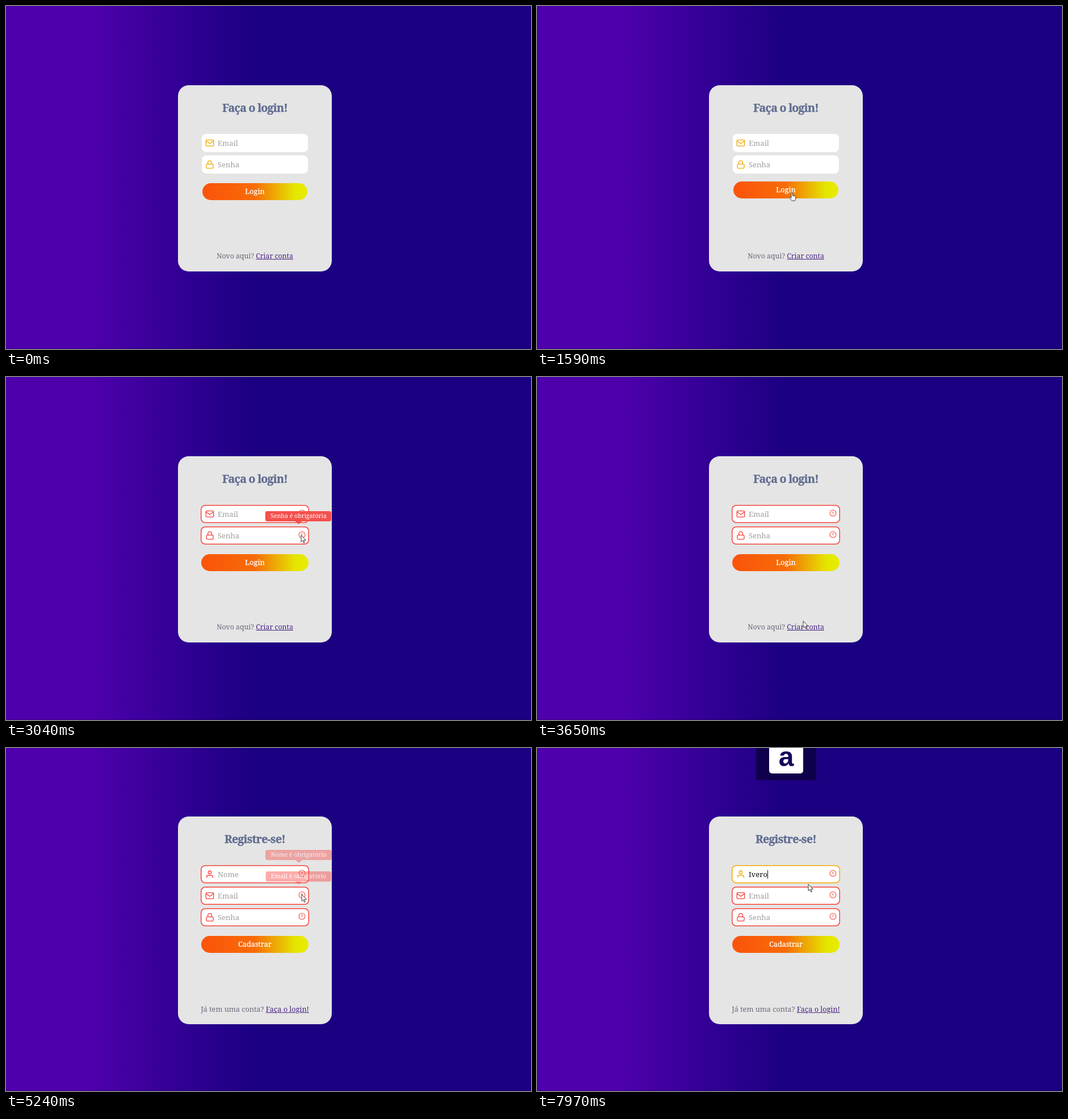
Recreate the animation shown at these times as an HTML page. Size 925 px wide and 606 px high, loop 8 s.

```html
<!DOCTYPE html>
<html lang="pt-BR">
<head>
<meta charset="utf-8">
<title>Login</title>
<style>
  html, body { margin: 0; width: 100%; height: 100%; overflow: hidden; }
  body {
    position: relative;
    background: linear-gradient(90deg, #4f00ad 140px, #1c0082 432px);
    font: 13px "Roboto Slab", "Noto Serif", serif;
    --loop: 8s linear infinite;
    --jump: 8s step-end infinite;
  }
  body::after {
    content: ""; position: absolute; left: 0; right: 0; bottom: 0;
    height: 1px; background: rgba(0, 0, 0, .25);
  }
  svg { position: absolute; overflow: visible; fill: none; stroke: currentColor;
    stroke-width: 2; stroke-linecap: round; stroke-linejoin: round; }

  /* Cards */
  .card { position: absolute; left: 302.7px; width: 271.6px; border-radius: 19px;
    background: #e5e5e5; white-space: nowrap; }
  #login { --late: 0s; top: 140px; height: 329px; animation: leave var(--jump); }
  #register { --late: 2.76s; top: 121px; height: 367px; animation: enter var(--jump); }
  @keyframes leave { 0% { visibility: visible } 48.125%, 100% { visibility: hidden } }
  @keyframes enter { 0% { visibility: hidden } 48.125%, 100% { visibility: visible } }

  h1 { position: absolute; top: 20px; width: 100%; margin: 0; text-align: center;
    font-size: 19.5px; line-height: 40px; letter-spacing: -.7px; color: #5f6c90;
    -webkit-text-stroke: .3px; }
  p { position: absolute; bottom: 16.8px; width: 100%; margin: 0; text-align: center;
    font-size: 12.3px; line-height: 20px; color: #6c667a; }
  #register p { font-size: 12.7px; }
  u { color: #4a2382; }

  /* Fields: the error state starts at 1820 ms plus the card's delay */
  .row { position: absolute; top: var(--y); width: 100%; height: 32px; line-height: 32px;
    color: #f2a900; animation: tint var(--loop) var(--late); }
  .box { position: absolute; left: 0; right: 0; margin: auto; width: 187.5px; height: 32px;
    border-radius: 8px; background: #fff; animation: outline var(--loop) var(--late); }
  .icon { left: 48.3px; top: 8px; width: 16px; height: 16px; }
  .hint { position: absolute; left: 70.3px; color: #a09d9b; }
  .alert { left: 212.6px; top: 7.8px; width: 13px; height: 13px; color: #f04a3c;
    opacity: 0; animation: alert var(--loop) var(--late); }
  .name { animation: tint-name var(--loop); }
  .name .hint { animation: hint var(--jump); }
  .name .box { animation: outline var(--loop) var(--late), focus var(--loop); }

  @keyframes tint {
    0%, 22.75% { color: #f2a900 } 26.25%, 65.5% { color: #f4433c }
    65.51%, 100% { color: #f2a900 }
  }
  @keyframes tint-name {
    0%, 57.25% { color: #f2a900 } 60.75%, 75.7% { color: #f4433c }
    78.7%, 100% { color: #f2a900 }
  }
  @keyframes outline {
    0%, 22.75% { width: 187.5px; box-shadow: inset 0 0 0 1px #f4433c00 }
    26.25%, 65.5% { width: 191px; box-shadow: inset 0 0 0 1.5px #f4433c }
    65.51%, 100% { width: 187.5px; box-shadow: inset 0 0 0 1px #f4433c00 }
  }
  @keyframes focus {
    0%, 57.25% { box-shadow: inset 0 0 0 1px #f4433c00 }
    60.75%, 75.7% { box-shadow: inset 0 0 0 1.5px #f4433c }
    78.7%, 100% { box-shadow: inset 0 0 0 1.5px #f2a900 }
  }
  @keyframes alert {
    0%, 22.75% { opacity: 0 } 24.4%, 65.5% { opacity: 1 } 65.51%, 100% { opacity: 0 }
  }
  @keyframes hint { 0% { opacity: 1 } 88.75%, 100% { opacity: 0 } }

  /* Typed name */
  .typed { position: absolute; left: 70.3px; display: flex; align-items: center;
    height: 32px; color: #111; }
  .typed b { font-weight: 400; font-size: 0;
    animation: type 8s step-end var(--at) infinite backwards; }
  .typed i { width: 1px; height: 15px; background: #111; opacity: 0;
    animation: caret var(--jump); }
  @keyframes type { 0% { font-size: 0 } 88.75%, 100% { font-size: 13px } }
  @keyframes caret {
    0% { opacity: 0 } 75.7% { opacity: 1 } 81.25% { opacity: 0 }
    87.5%, 100% { opacity: 1 }
  }

  /* Tooltips */
  .tip { position: absolute; left: 212.8px; top: -27px; padding: 0 9px;
    transform: translateX(-50%); border-radius: 4px; background: #f5504e; color: #fff;
    font-size: 10.6px; line-height: 17.5px; opacity: 0; }
  .tip::after { content: ""; position: absolute; left: 50%; top: 100%; margin-left: -6px;
    border: 6px solid transparent; border-top: 5px solid #f5504e; border-bottom: 0; }
  #login .t1 { animation: tip1 var(--loop) }
  #login .t2 { animation: tip2 var(--loop) }
  #register .t1 { animation: tip3 var(--loop) }
  #register .t2 { animation: tip4 var(--loop) }
  #register .t3 { animation: tip5 var(--loop) }
  @keyframes tip1 { 0%, 29.2% { opacity: 0 } 32.4%, 34.4% { opacity: 1 } 36.9%, 100% { opacity: 0 } }
  @keyframes tip2 { 0%, 35.2% { opacity: 0 } 37.5%, 38.7% { opacity: 1 } 41.6%, 100% { opacity: 0 } }
  @keyframes tip3 { 0%, 61.2% { opacity: 0 } 63.6%, 64.2% { opacity: 1 } 66.6%, 100% { opacity: 0 } }
  @keyframes tip4 { 0%, 64.7% { opacity: 0 } 66.4%, 67% { opacity: 1 } 69%, 100% { opacity: 0 } }
  @keyframes tip5 { 0%, 67.5% { opacity: 0 } 69.1%, 69.8% { opacity: 1 } 72%, 100% { opacity: 0 } }

  /* Buttons */
  .btn { position: absolute; left: 0; right: 0; margin: auto; width: 185px; height: 29.5px;
    border-radius: 15px; color: #fff; text-align: center; line-height: 29.5px;
    font-size: 12.7px; font-weight: 500; -webkit-text-stroke: .25px;
    background: linear-gradient(90deg, #fb530a, #f76c08 50%, #e4e600 88%, #e8ec00); }
  #login .btn { top: 173px; animation: grow var(--loop), lift1 var(--loop); }
  #register .btn { top: 211px; animation: grow var(--loop) var(--late), lift2 var(--loop); }
  @keyframes grow {
    0%, 22.75% { width: 185px } 26.25%, 65.5% { width: 189px } 65.51%, 100% { width: 185px }
  }
  @keyframes lift1 {
    0%, 16.5% { transform: none } 18.8%, 24.1% { transform: translateY(-3px) }
    27%, 39.3% { transform: none } 40.2% { transform: translateY(-1.5px) }
    42%, 100% { transform: none }
  }
  @keyframes lift2 {
    0%, 54.8% { transform: none } 57%, 58% { transform: translateY(-3px) }
    61.3%, 100% { transform: none }
  }

  /* Caps lock overlay */
  .caps { position: absolute; left: 386px; top: 0; width: 105.5px; height: 57px;
    border-radius: 0 0 3px 3px; background: rgba(14, 0, 66, .85); opacity: 0;
    animation: caps var(--jump); }
  .key { position: absolute; left: 23px; top: -15px; width: 60px; height: 60px;
    border-radius: 5px; background: #fff; color: #150459; overflow: hidden;
    font: bold 48px/60px "Liberation Sans", Arial, sans-serif; text-align: center; }
  .key span { position: absolute; left: 0; width: 100%; top: 1px; }
  .upper { animation: upper var(--jump); }
  .lower { animation: lower var(--jump); }
  @keyframes caps { 0% { opacity: 0 } 87.5%, 100% { opacity: 1 } }
  @keyframes upper { 0% { opacity: 1 } 90.375%, 100% { opacity: 0 } }
  @keyframes lower { 0% { opacity: 0 } 90.375%, 100% { opacity: 1 } }

  /* Pointer: a 40px window on a strip of three shapes, hotspot in the middle */
  .pointer { position: absolute; left: -20px; top: -20px; z-index: 9; width: 40px; height: 40px;
    overflow: hidden; animation: move var(--loop); }
  .pointer svg { left: 0; top: 0; width: 120px; height: 40px; fill: #fff; stroke: #222;
    stroke-width: .9; animation: shape var(--jump); }
  @keyframes shape {
    0%, 15.6%, 24.1%, 29.2%, 40.1%, 48.125%, 57.6%, 61.1%, 79%, 100% { transform: none }
    16.6%, 39.3%, 46.2%, 54.9% { transform: translateX(-40px) }
    10.7%, 24.9%, 58%, 70.1% { transform: translateX(-80px) }
  }
  @keyframes move {
    0%, 2.49% { transform: translate(950px, 640px) }
    2.5% { transform: translate(882px, 598px) }
    6.25% { transform: translate(640px, 424px) }
    8.75% { transform: translate(560px, 345px) }
    10.625% { transform: translate(532px, 288px) }
    12.5% { transform: translate(450px, 243px) }
    13.75% { transform: translate(450px, 241px) }
    15% { transform: translate(450px, 255px) }
    17.5% { transform: translate(449px, 322px) }
    18.75%, 23.5% { transform: translate(449px, 329.5px) }
    25% { transform: translate(448px, 292px) }
    26.25% { transform: translate(457px, 276px) }
    29.75% { transform: translate(515px, 239px) }
    30.625% { transform: translate(517px, 237px) }
    33.75% { transform: translate(518px, 239px) }
    35.625% { transform: translate(520px, 277px) }
    38.125% { transform: translate(520px, 280px) }
    39.375% { transform: translate(518px, 313px) }
    41.25% { transform: translate(492px, 388px) }
    43.25%, 45.625% { transform: translate(469px, 431.5px) }
    46.5% { transform: translate(469px, 441px) }
    49.875%, 52.25% { transform: translate(470px, 443px) }
    55% { transform: translate(461px, 358px) }
    56%, 57.25% { transform: translate(458px, 345px) }
    59.125% { transform: translate(485px, 273px) }
    61.5% { transform: translate(519px, 223px) }
    63.5% { transform: translate(520px, 221px) }
    65% { transform: translate(521px, 258px) }
    66.375% { transform: translate(521px, 261px) }
    67.875% { transform: translate(520px, 296px) }
    68.75% { transform: translate(518px, 299px) }
    70% { transform: translate(490px, 316px) }
    71.25% { transform: translate(450px, 250px) }
    72.5% { transform: translate(438px, 224px) }
    73.5%, 76% { transform: translate(435.5px, 223px) }
    80%, 98.625% { transform: translate(520.5px, 243.5px) }
    99.625%, 100% { transform: translate(478px, 241px) }
  }
</style>
</head>
<body>
<svg width="0" height="0">
  <symbol id="mail" viewBox="0 0 24 24">
    <rect x="2" y="4" width="20" height="16" rx="2"/><path d="M22 6.5 12 13.5 2 6.5"/>
  </symbol>
  <symbol id="lock" viewBox="0 0 24 24">
    <rect x="3" y="11" width="18" height="11" rx="2"/><path d="M7 11V7a5 5 0 0 1 10 0v4"/>
  </symbol>
  <symbol id="user" viewBox="0 0 24 24">
    <path d="M20 21v-2a4 4 0 0 0-4-4H8a4 4 0 0 0-4 4v2"/><circle cx="12" cy="7" r="4"/>
  </symbol>
  <symbol id="warn" viewBox="0 0 24 24">
    <circle cx="12" cy="12" r="10"/><path d="M12 7v5.5M12 16.5v.1"/>
  </symbol>
</svg>

<div class="caps"><div class="key"><span class="upper">A</span><span class="lower">a</span></div></div>

<main class="card" id="login">
  <h1>Faça o login!</h1>
  <div class="row" style="--y: 86px">
    <div class="box"></div>
    <svg class="icon"><use href="#mail"/></svg>
    <span class="hint">Email</span>
    <svg class="alert"><use href="#warn"/></svg>
    <span class="tip t1">Email é obrigatório</span>
  </div>
  <div class="row" style="--y: 124px">
    <div class="box"></div>
    <svg class="icon"><use href="#lock"/></svg>
    <span class="hint">Senha</span>
    <svg class="alert"><use href="#warn"/></svg>
    <span class="tip t2">Senha é obrigatória</span>
  </div>
  <div class="btn">Login</div>
  <p>Novo aqui? <u>Criar conta</u></p>
</main>

<main class="card" id="register">
  <h1>Registre-se!</h1>
  <div class="row name" style="--y: 86px">
    <div class="box"></div>
    <svg class="icon"><use href="#user"/></svg>
    <span class="hint">Nome</span>
    <span class="typed"><b style="--at: 0s">I</b><b style="--at: .33s">v</b><b style="--at: .49s">e</b><b style="--at: .64s">r</b><b style="--at: .8s">o</b><i></i></span>
    <svg class="alert"><use href="#warn"/></svg>
    <span class="tip t1">Nome é obrigatório</span>
  </div>
  <div class="row" style="--y: 124px">
    <div class="box"></div>
    <svg class="icon"><use href="#mail"/></svg>
    <span class="hint">Email</span>
    <svg class="alert"><use href="#warn"/></svg>
    <span class="tip t2">Email é obrigatório</span>
  </div>
  <div class="row" style="--y: 162px">
    <div class="box"></div>
    <svg class="icon"><use href="#lock"/></svg>
    <span class="hint">Senha</span>
    <svg class="alert"><use href="#warn"/></svg>
    <span class="tip t3">Senha é obrigatória</span>
  </div>
  <div class="btn">Cadastrar</div>
  <p>Já tem uma conta? <u>Faça o login!</u></p>
</main>

<div class="pointer">
  <svg viewBox="0 0 120 40">
    <path d="M20 20v11.3l2.6-2.4 2 4.5 1.7-.8-1.9-4.3H28Z"/>
    <path d="M58.8 21a1.2 1.2 0 0 1 2.4 0v4.5l4.3.9c1.2.3 1.6 1 1.5 2.2l-.5 3.4-1 2.5H60l-4-5.2c-.7-1 .6-2 1.5-1.2l1.3 1.3Z"/>
    <path fill="none" d="M97.5 14.500h1.700l.8.700.8-.7h1.700M100 15v10.500M97.500 26h1.700l.8-.7.8.7h1.700"/>
  </svg>
</div>
</body>
</html>
```
